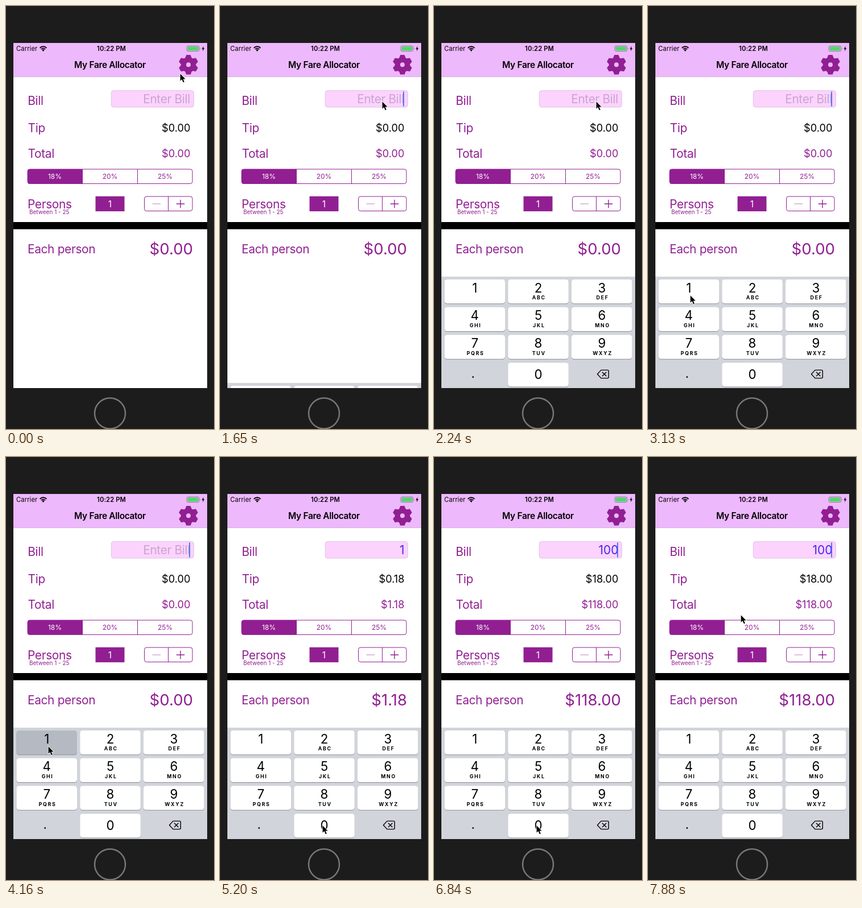
An HTML page that plays this animation: 366x744 px, repeating every 8 s.

```html
<!DOCTYPE html>
<html lang="en">
<head>
<meta charset="utf-8">
<title>Fare allocator</title>
<style>
  html, body { margin: 0; width: 100%; height: 100%; overflow: hidden; background: #1c1c1c; }
  svg { display: block; font-family: Inter, "Liberation Sans", sans-serif; font-optical-sizing: none; }
  .label { font-size: 20.8px; letter-spacing: -.015em; }
  .amount { font-size: 18.2px; }
  .small { font-size: 12px; }
  .status { font-size: 11.2px; letter-spacing: .01em; }
  .digit { font-size: 22.3px; }
  .letters { font-size: 8.8px; font-weight: 700; letter-spacing: 1.7px; }
  .end { text-anchor: end; }
  .mid { text-anchor: middle; }
  .purple { fill: #911f92; }
  .line { fill: none; stroke: #911f92; }
</style>
</head>
<body>
<svg width="366" height="744" viewBox="0 0 366 744">
  <defs>
    <clipPath id="screen"><rect x="13" y="65" width="341" height="607"/></clipPath>
  </defs>
  <rect width="366" height="744" fill="#1c1c1c"/>
  <circle cx="183" cy="716.5" r="27" fill="none" stroke="#777" stroke-width="2.5"/>

  <g clip-path="url(#screen)">
    <rect x="13" y="65" width="341" height="607" fill="#fff"/>
    <rect x="13" y="65" width="341" height="59" fill="#edb8fc"/>
    <rect x="13" y="124" width="341" height=".8" fill="#c9a3d4"/>

    <!-- status bar -->
    <text class="status" x="18" y="79">Carrier</text>
    <g fill="none" stroke="#000" stroke-width="1.9">
      <path d="M59.6 73.8a8.2 8.2 0 0 1 11.8 0M61.9 76.2a5 5 0 0 1 7.2 0"/>
      <path d="M63.4 77.4a3 3 0 0 1 4.2 0L65.5 79.9z" fill="#000" stroke="none"/>
    </g>
    <text class="status mid" x="185.5" y="79" font-weight="600">10:22 PM</text>
    <rect x="318.2" y="70.2" width="21.6" height="9.4" rx="2.2" fill="none" stroke="#8a6c93" stroke-width=".9"/>
    <rect x="319.6" y="71.6" width="18.8" height="6.6" rx="1" fill="#4cd964"/>
    <path d="M341 73.4q1.6 1.5 0 3z" fill="#8a6c93"/>
    <path d="M347.8 70.6l-3.4 5h2.2l-.8 3.8 3.5-5.2h-2.2z"/>

    <!-- title and gear -->
    <text class="mid" x="183" y="109" font-size="15.4" font-weight="600" letter-spacing="-.3">My Fare Allocator</text>
    <g id="gear" class="purple" transform="translate(321 103.3)">
      <circle r="13.2"/>
      <circle r="4" fill="#edb8fc"/>
    </g>

    <!-- form -->
    <g class="purple">
      <text class="label" x="38.2" y="174">Bill</text>
      <text class="label" x="38.6" y="222">Tip</text>
      <text class="label" x="38.6" y="267">Total</text>
      <text class="label" x="38" y="356">Persons</text>
      <text x="41" y="366" font-size="10">Between 1 - 25</text>
      <text class="label" x="38" y="434.5">Each person</text>
    </g>
    <rect x="185.3" y="148.7" width="145" height="29.3" rx="4" fill="#fbd3fd" stroke="#dfbbe3" stroke-width=".9"/>
    <text id="hint" class="label end" x="324" y="171" fill="#c9a5d0">Enter Bill</text>
    <text id="bill" class="end" x="324.5" y="171" font-size="21" fill="#4a25ee"></text>
    <rect id="caret" x="322.2" y="150.5" width="1.8" height="26" fill="#426bf2"/>
    <text id="tip" class="amount end" x="324.5" y="220.5"></text>
    <text id="total" class="amount end purple" x="324.5" y="266"></text>
    <text id="each" class="end purple" x="329" y="437" font-size="27.6"></text>

    <!-- segments, head count, stepper -->
    <path class="purple" d="M134.5 287H42a4 4 0 0 0-4 4v18a4 4 0 0 0 4 4h92.5z"/>
    <rect class="line" x="38" y="287" width="290" height="25.5" rx="3.8"/>
    <path class="line" d="M134.5 287v26M231.5 287v26"/>
    <g class="mid">
      <text class="small" x="86" y="304.2" fill="#fff">18%</text>
      <text class="small purple" x="183" y="304.2">20%</text>
      <text class="small purple" x="280" y="304.2">25%</text>
    </g>
    <rect class="purple" x="157.5" y="334.7" width="51" height="26.4"/>
    <text class="mid" x="183" y="353.5" font-size="15.5" fill="#fff">1</text>
    <rect class="line" x="243.5" y="335" width="84.5" height="25.5" rx="3.8"/>
    <path class="line" d="M285.5 335v26"/>
    <path class="line" d="M257.5 348h14.5" opacity=".45" stroke-width="1.3"/>
    <path class="line" d="M299.8 348h14.5M307 340.8v14.4" stroke-width="1.4"/>
    <rect x="13" y="380" width="341" height="12.6"/>

    <g id="keyboard">
      <rect x="13" y="476" width="341" height="200" fill="#d1d4da"/>
      <text class="digit mid" x="68.7" y="653.5">.</text>
      <g fill="none" stroke="#000" stroke-width="1.4" stroke-linejoin="round">
        <path d="M287.5 647.5l5.8-6.4q.7-.7 1.7-.7h10.3q2 0 2 2v10.2q0 2-2 2H295q-1 0-1.7-.7z"/>
        <path d="M296.4 644.2l6.6 6.6M303 644.2l-6.6 6.6" stroke-linecap="round"/>
      </g>
    </g>
  </g>

  <path id="pointer" d="M.6 1.2v12.6l2.9-2.7 2.3 5.2 2-.9-2.2-4.9h4z" stroke="#fff" stroke-width="1.6" paint-order="stroke"/>
</svg>

<script>
const LOOP = 8000;
const TICK = 148.4;  // the screen refreshes in coarse steps; all times below count ticks
const FOCUS = 11;    // the bill field gains focus and the keyboard rises
const BLINK = 7;
const $ = id => document.getElementById(id);

function add(parent, tag, attrs, text = '') {
  const node = document.createElementNS('http://www.w3.org/2000/svg', tag);
  for (const name in attrs) node.setAttribute(name, attrs[name]);
  node.textContent = text;
  return parent.appendChild(node);
}

for (let i = 0; i < 6; i++) {
  add($('gear'), 'path', { d: 'M-6-11L-4-16.6Q-3.7-17.3-3-17.3H3Q3.7-17.3 4-16.6L6-11z', transform: `rotate(${i * 60})` });
}

const captions = ['', '', 'ABC', 'DEF', 'GHI', 'JKL', 'MNO', 'PQRS', 'TUV', 'WXYZ'];
const keys = captions.map((caption, n) => {
  const slot = n ? n - 1 : 10;
  const x = 18.4 + slot % 3 * 111.8, y = 481 + Math.floor(slot / 3) * 48.8;
  const box = { x, width: 106.6, height: 42.2, rx: 4.5 };
  const middle = x + 53.3;
  add($('keyboard'), 'rect', { ...box, y: y + 1, fill: '#8b8e94' });
  const face = add($('keyboard'), 'rect', { ...box, y });
  add($('keyboard'), 'text', { class: 'digit mid', x: middle, y: y + (n ? 22.5 : 29) }, n);
  add($('keyboard'), 'text', { class: 'letters mid', x: middle + 1.3, y: y + 35.4 }, caption);
  return face;
});

const start = { x: 306, y: 118 };
const moves = [
  { from: 2, to: 5, x: 285, y: 167, bow: 0 },      // bill field
  { from: 17, to: 21, x: 74, y: 508, bow: 0 },     // key 1
  { from: 29, to: 34, x: 180, y: 647, bow: 0 },    // key 0
  { from: 48, to: 53, x: 163, y: 277, bow: -100 }  // segments
];
const taps = [{ at: 28, key: 1 }, { at: 36, key: 0 }, { at: 38, key: 0 }];

const clamp = v => Math.min(1, Math.max(0, v));
const smooth = v => v * v * (3 - 2 * v);
const money = value => '$' + value.toFixed(2);

function pointerAt(tick) {
  let { x, y } = start;
  for (const move of moves) {
    const p = smooth(clamp((tick - move.from) / (move.to - move.from)));
    x += (move.x - x) * p + move.bow * Math.sin(Math.PI * p);
    y += (move.y - y) * p;
  }
  return [x, y];
}

// Critically damped spring, from fully hidden to rest.
function keyboardOffset(tick) {
  const u = 2.6 * Math.max(0, tick - FOCUS + .13);
  return Math.round(196 * (1 + u) * Math.exp(-u));
}

// The blink restarts with each typed digit.
function caretOpacity(tick, typed) {
  if (tick < FOCUS) return 0;
  const since = tick - (typed.length ? typed.at(-1).at + 1 : FOCUS);
  return clamp(.8 + 1.5 * Math.cos(2 * Math.PI * (since - 1.6) / BLINK));
}

function render() {
  const tick = Math.floor(performance.now() % LOOP / TICK);
  const typed = taps.filter(tap => tap.at < tick);
  const pressed = taps.find(tap => tap.at === tick)?.key;
  const bill = typed.map(tap => tap.key).join('');

  $('pointer').setAttribute('transform', `translate(${pointerAt(tick)})`);
  $('keyboard').setAttribute('transform', `translate(0 ${keyboardOffset(tick)})`);
  $('caret').setAttribute('opacity', caretOpacity(tick, typed));
  $('hint').setAttribute('opacity', bill ? 0 : 1);
  $('bill').textContent = bill;
  $('tip').textContent = money(bill * .18);
  $('total').textContent = $('each').textContent = money(bill * 1.18);
  keys.forEach((face, n) => face.setAttribute('fill', n === pressed ? '#b4b9c2' : '#fff'));
  requestAnimationFrame(render);
}
render();
</script>
</body>
</html>
```
